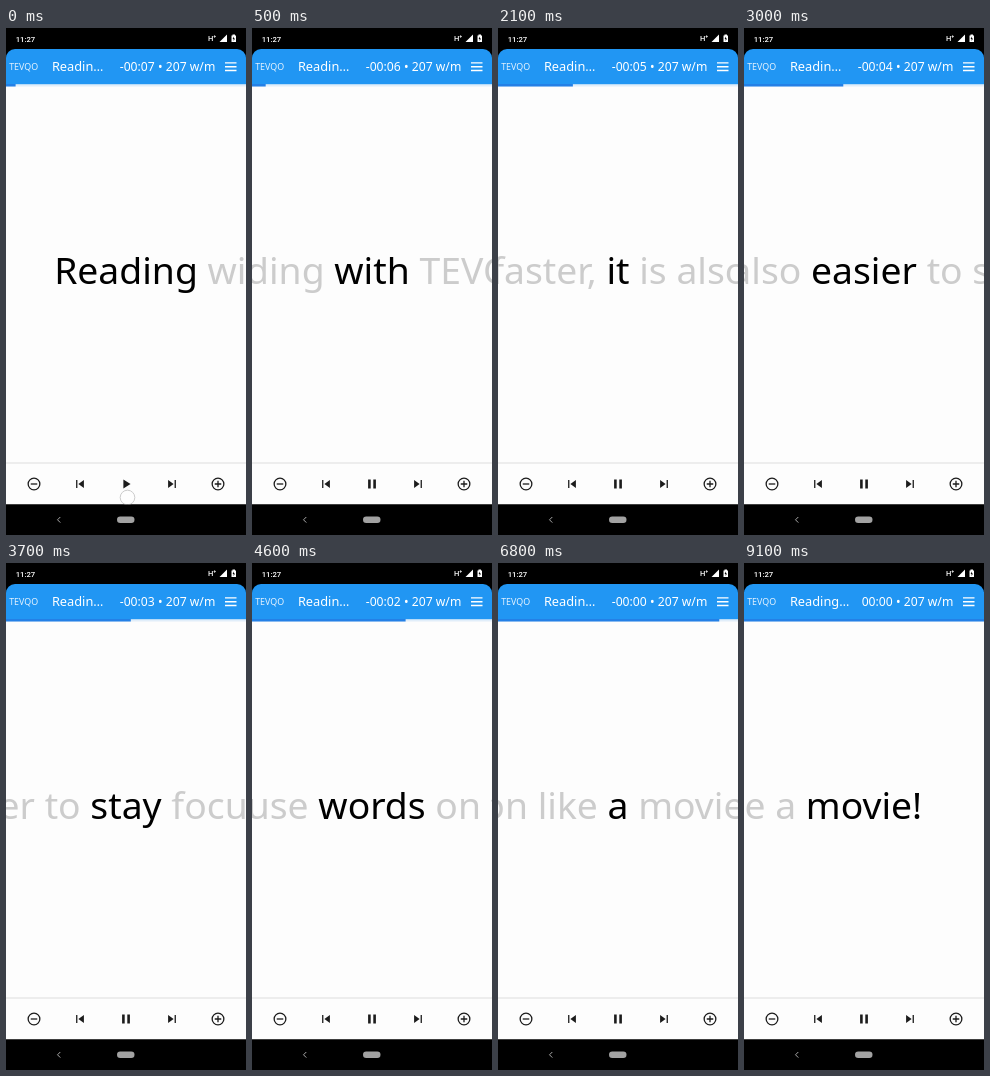
An HTML page that plays this animation: 240x507 px, repeating every 9.8 s.

```html
<!DOCTYPE html>
<html lang="en">
<head>
<meta charset="utf-8">
<title>Speed reader</title>
<style>
  html, body { margin: 0; width: 100%; height: 100%; overflow: hidden; background: #000; }
  svg { display: block; width: 100vw; height: 100vh; font-family: "Noto Sans", sans-serif; }
  text { white-space: pre; }
  .word { font-size: 37.3px; }
  .side { fill: #ccc; }
  .line { fill: none; stroke: #1c1c1c; stroke-width: 2; }
  .status { font-family: Roboto, sans-serif; font-weight: 500; }
</style>
</head>
<body>
<svg viewBox="0 0 240 507">
  <rect width="240" height="507"/>
  <rect y="50" width="240" height="426.500" fill="#fdfdfd"/>

  <!-- status bar -->
  <g fill="#fff">
    <text class="status" x="9.700" y="13.700" font-size="7.700">11:27</text>
    <text class="status" x="202" y="13.300" font-size="7.500">H⁺</text>
    <path d="M221 6.500V14H213.500Z"/>
    <path d="M226.500 6.500h2.500v1h1V14h-4.500V7.500h1Z"/>
    <path d="M228 8.500l-1.400 2.500h1v2l1.400-2.500h-1Z" fill="#000"/>
  </g>

  <!-- header -->
  <path d="M0 56.500V30A9 9 0 0 1 9 21H231A9 9 0 0 1 240 30V56.500Z" fill="#2196f3"/>
  <rect y="56.500" width="240" height="2" fill="#e1eefa"/>
  <rect id="bar" y="56" height="2.500" fill="#2480e6"/>
  <g fill="#fff">
    <text x="3.200" y="42.300" font-size="8.900" fill="#e4f2fe">TEVQO</text>
    <text id="title" x="45.900" y="43.300" font-size="12.800"></text>
    <text id="clock" x="209.300" y="43.300" font-size="12.200" text-anchor="end"></text>
    <path d="M219 34.200h11.500v1.400H219zM219 38h11.500v1.400H219zM219 41.800h11.500v1.400H219z"/>
  </g>

  <!-- running text -->
  <text id="prev" class="word side" y="255.800" text-anchor="end"></text>
  <text id="next" class="word side" y="255.800"></text>
  <text id="now" class="word" x="120" y="255.800" text-anchor="middle"></text>

  <!-- controls -->
  <rect y="434.500" width="240" height="1" fill="#dedede"/>
  <g id="icons" fill="#1c1c1c"></g>
  <circle id="touch" cx="121.500" cy="469.500" r="7.300" fill="#fff" fill-opacity=".5" stroke="#ccc"/>

  <!-- system navigation -->
  <rect y="476.500" width="240" height="30.500"/>
  <path d="M54.300 489l-2.800 2.800 2.800 2.800" fill="none" stroke="#aaa"/>
  <rect x="111" y="488.500" width="17.500" height="6.500" rx="3.250" fill="#a2a2a2"/>
</svg>
<script>
const LOOP = 9800, DONE = 7100, BAR_TIME = 120, SPACE = 37.3 * 0.26;
const words = ("Reading with TEVQO is not only faster, it is also easier to stay focused " +
  "because words on the screen grab your attention like a movie!").split(" ");
const starts = [0, 450, 750, 950, 1155, 1350, 1570, 2005, 2260, 2560, 2960, 3350, 3560, 3860,
  4160, 4460, 4760, 5060, 5270, 5555, 5860, 6050, 6350, 6795, 6880];
const $ = id => document.getElementById(id);

const ring = '<circle class="line" cx="12" cy="12" r="9"/>';
const shapes = [
  ring + '<path class="line" d="M7 12h10"/>',
  '<path d="M6 6h2v12H6zM9.500 12l8.500 6V6z"/>',
  '<path id="play" d="M8 5v14l11-7z"/><path id="pause" d="M6 5h4v14H6zM14 5h4v14h-4z"/>',
  '<path d="M6 18l8.500-6L6 6zM16 6h2v12h-2z"/>',
  ring + '<path class="line" d="M7 12h10M12 7v10"/>'
];
$("icons").innerHTML = shapes.map((s, i) =>
  `<g transform="translate(${28 + 46 * i} 456) scale(.65) translate(-12 -12)">${s}</g>`).join("");

const show = (id, on) => $(id).setAttribute("visibility", on ? "visible" : "hidden");
let shown = -1;

function setWord(i) {
  if (i === shown) return;
  shown = i;
  $("now").textContent = words[i];
  $("prev").textContent = words.slice(Math.max(0, i - 4), i).join(" ");
  $("next").textContent = words.slice(i + 1, i + 5).join(" ");
  const reach = $("now").getComputedTextLength() / 2 + SPACE;
  $("prev").setAttribute("x", 120 - reach);
  $("next").setAttribute("x", 120 + reach);
}

function draw(t) {
  const n = words.length;
  const i = starts.filter(s => s <= t).length - 1;
  setWord(i);

  const grow = i ? Math.min(1, (t - starts[i]) / BAR_TIME) : 1;
  $("bar").setAttribute("width", 240 * (i + grow) / n);

  const done = t >= DONE;
  const left = Math.floor((n - i) * 60 / 207);
  $("title").textContent = done ? "Reading…" : "Readin…";
  $("clock").textContent = (done ? "00:00" : "-00:0" + left) + " • 207 w/m";

  show("touch", t < 200);
  show("play", t < 250);
  show("pause", t >= 250);
}

const begin = performance.now();
function tick() {
  draw((performance.now() - begin) % LOOP);
  requestAnimationFrame(tick);
}
tick();
</script>
</body>
</html>
```
